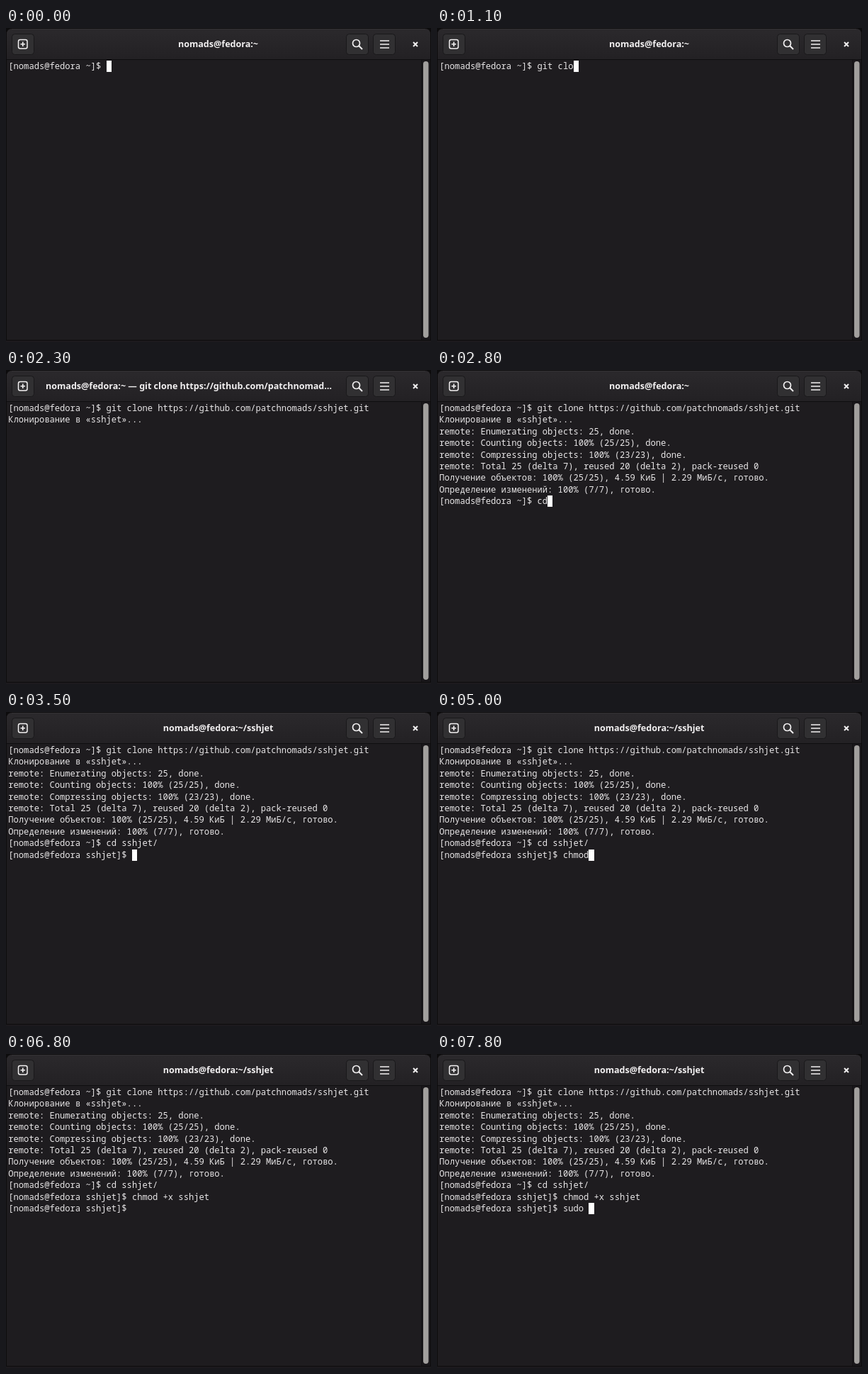
Write an HTML page that moves like this. It is 600x443 px and loops after 8 s.

```html
<!DOCTYPE html>
<html lang="ru">
<head>
<meta charset="utf-8">
<title>Terminal</title>
<style>
  html, body { margin: 0; width: 100%; height: 100%; overflow: hidden; background: #1e1c1f; }
  #stage { position: relative; width: 600px; height: 443px; overflow: hidden; }
  svg { position: absolute; left: 0; top: 0; }
  #title { position: absolute; top: 13px; transform: translateX(-50%); white-space: pre;
    font: bold 12.55px/20px "Noto Sans", sans-serif; color: #f2f0f1; }
  #screen { position: absolute; left: 3.3px; top: 46px; margin: 0; color: #e9e7e8;
    font: 12.13px/16.4px "Noto Sans Mono", monospace; }
  #cursor { position: absolute; width: 7.3px; height: 16px; background: #fff; }
</style>
</head>
<body>
<div id="stage">
  <svg width="600" height="443">
    <defs>
      <linearGradient id="bar" x2="0" y2="1"><stop stop-color="#2b292c"/><stop offset="1" stop-color="#232124"/></linearGradient>
    </defs>
    <rect width="600" height="443" fill="#0d0c0d"/>
    <path d="M1 443V9Q1 1 9 1H591Q599 1 599 9V443Z" fill="#1e1c1f"/>
    <path d="M1 44V9Q1 1 9 1H591Q599 1 599 9V44Z" fill="url(#bar)"/>
    <path d="M8 1.5H592" stroke="#343235"/>
    <path d="M1 44.5H599" stroke="#0f0e10"/>
    <rect x="586" y="45" width="13" height="395" fill="#19171a"/>
    <path d="M586.5 45V440" stroke="#121113"/>
    <rect x="589" y="47" width="7.500" height="390" rx="3.700" fill="#a19f9d"/>
    <path d="M0 440.5H600" stroke="#0d0c0d"/>
    <path d="M0 442H600" stroke="#1c1a1d" stroke-width="2"/>
    <g fill="#313032" stroke="#19181a">
      <rect x="8.5" y="8.5" width="31" height="29" rx="4"/>
      <rect x="480.5" y="8.5" width="31" height="29" rx="4"/>
      <rect x="518.5" y="8.5" width="31" height="29" rx="4"/>
    </g>
    <g fill="none" stroke="#f2f0f1" stroke-width="1.7">
      <rect x="17.500" y="16.500" width="12.500" height="12.500" rx="2.500" stroke-width="1.500"/>
      <path d="M23.750 19.500V26M20.500 22.750H27"/>
      <circle cx="494.500" cy="21.500" r="5"/>
      <path d="M498 25L503 30" stroke-width="2"/>
      <path d="M528 18H541M528 23H541M528 28H541"/>
      <path d="M575 20L581 26M581 20L575 26" stroke-width="2"/>
    </g>
  </svg>
  <div id="title"></div>
  <pre id="screen"></pre>
  <div id="cursor"></div>
</div>
<script>
const LOOP = 8000, BLINK = 600, LEFT = 3.3, TOP = 46, CELL = 7.278, ROW = 16.4;
const $ = id => document.getElementById(id);

const prompt = dir => `[nomads@fedora ${dir}]$ `;
const repo = 'https://github.com/patchnomads/sshjet.git';

// Keystrokes: [ms, text]; each restarts the cursor blink.
const keys = [
  [200, 'g'], [300, 'i'], [500, 't'], [600, ' '], [800, 'c'], [1000, 'l'],
  [1100, 'o'], [1200, 'n'], [1300, 'e'], [1500, ' '], [1700, repo + '\n'],
  [2700, 'c'], [2800, 'd'], [2900, ' '], [3000, 's'], [3100, 's'], [3300, 'hjet/'], [3400, '\n'],
  [4000, 'c'], [4200, 'h'], [4400, 'm'], [4700, 'o'], [5000, 'd'], [5100, ' '],
  [5300, '+'], [5400, 'x'], [5500, ' '], [5700, 's'], [5800, 's'], [6000, 'hjet'], [6200, '\n'],
  [7200, 's'], [7300, 'u'], [7500, 'd'], [7600, 'o'], [7800, ' '],
];
const output = [
  [0, prompt('~')],
  [1800, 'Клонирование в «sshjet»...\n'],
  [2400, `remote: Enumerating objects: 25, done.
remote: Counting objects: 100% (25/25), done.
remote: Compressing objects: 100% (23/23), done.
remote: Total 25 (delta 7), reused 20 (delta 2), pack-reused 0
`],
  [2500, `Получение объектов: 100% (25/25), 4.59 КиБ | 2.29 МиБ/с, готово.
Определение изменений: 100% (7/7), готово.
` + prompt('~')],
  [3400, prompt('sshjet')],
  [6200, prompt('sshjet')],
];
// Window titles: [ms, text, centre x]
const titles = [
  [0, 'nomads@fedora:~', 299.5],
  [1700, 'nomads@fedora:~ — git clone https://github.com/patchnomad…', 258],
  [2500, 'nomads@fedora:~', 299.5],
  [3400, 'nomads@fedora:~/sshjet', 299.5],
];
const log = [...keys, ...output].sort((a, b) => a[0] - b[0]);

function draw(now) {
  const t = now % LOOP;
  const past = list => list.filter(([ms]) => ms <= t);

  const text = past(log).map(entry => entry[1]).join('');
  const lines = text.split('\n');
  $('screen').textContent = text;

  const [, title, center] = past(titles).pop();
  $('title').textContent = title;
  $('title').style.left = center + 'px';

  const [lastKey] = past(keys).pop() || [0];
  const cursor = $('cursor').style;
  cursor.left = LEFT + lines.at(-1).length * CELL + 'px';
  cursor.top = TOP + (lines.length - 1) * ROW + 'px';
  cursor.visibility = Math.floor((t - lastKey) / BLINK) % 2 ? 'hidden' : 'visible';
}

const start = performance.now();
(function tick() {
  draw(performance.now() - start);
  requestAnimationFrame(tick);
})();
</script>
</body>
</html>
```
